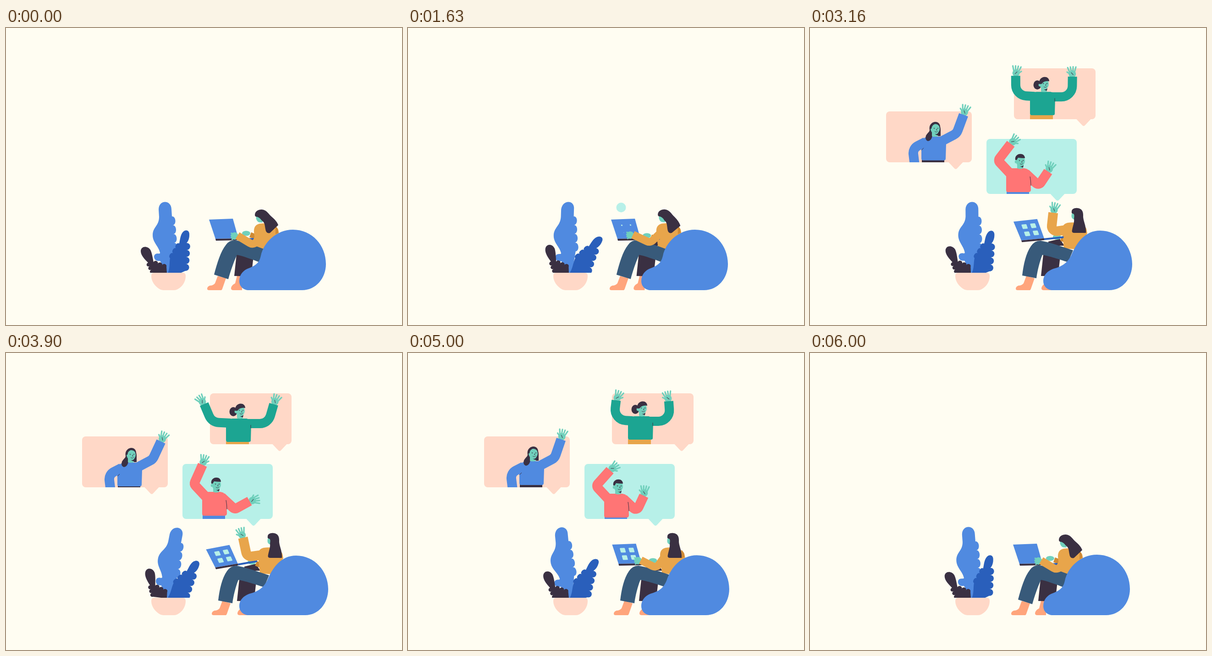
Write an HTML page with a canvas that moves like this. It is 864 px wide and 648 px high and loops after 6.03 s.

```html
<!DOCTYPE html>
<html lang="en">
<head>
<meta charset="utf-8">
<title>Video call</title>
<style>
html, body { margin: 0; width: 100%; height: 100%; overflow: hidden; background: #fffdf2; }
canvas { display: block; }
</style>
</head>
<body>
<canvas width="864" height="648"></canvas>
<script>
const g = document.querySelector('canvas').getContext('2d');
const LOOP = 6030, TAU = Math.PI * 2, DEG = Math.PI / 180;
const C = {
  paper: '#fffdf2', blue: '#508ae0', deep: '#2a5fbb', dark: '#3a3042', peach: '#ffd8c7', leg: '#ffa57c',
  gold: '#e8a54b', amber: '#cf8a34', skin: '#70d0bc', jeans: '#385a7a', mint: '#b7f0e8', coral: '#ff7575', green: '#1ca592'
};

/* ---- timing ---- */
const clamp = u => Math.max(0, Math.min(1, u));
const smooth = u => (u = clamp(u), u * u * (3 - 2 * u));
const lerp = (a, b, u) => a + (b - a) * u;
const ramp = (t, a, b) => smooth((t - a) / (b - a));
const span = (t, a, b, c, d) => ramp(t, a, b) * (1 - ramp(t, c, d));
const swing = t => Math.cos(TAU * (t - 3900) / 2200);

/* ---- drawing ---- */
function fill(d, color) {
  g.fillStyle = color;
  g.fill(new Path2D(d));
}

function line(d, color, width) {
  g.strokeStyle = color;
  g.lineWidth = width;
  g.stroke(new Path2D(d));
}

function dot(x, y, rx, ry, color) {
  g.fillStyle = color;
  g.beginPath();
  g.ellipse(x, y, rx, ry, 0, 0, TAU);
  g.fill();
}

function shifted(x, y, paint) {
  g.save();
  g.translate(x, y);
  paint();
  g.restore();
}

// Blend two paths that share one structure
function mix(a, b, u) {
  const num = /-?\d+/g, to = b.match(num);
  let i = 0;
  return a.replace(num, v => lerp(+v, +to[i++], u));
}

// Row of outward bumps along a straight edge
function scallop(x0, y0, x1, y1, n, size) {
  const dx = (x1 - x0) / n, dy = (y1 - y0) / n, k = size / Math.hypot(dx, dy);
  let d = `L${x0},${y0}`;
  for (let i = 0; i < n; i++) {
    const x = x0 + dx * i, y = y0 + dy * i, nx = dy * k, ny = -dx * k;
    const at = (px, py) => `${px.toFixed(1)},${py.toFixed(1)} `;
    d += 'C' + at(x + nx, y + ny) + at(x + dx + nx, y + dy + ny) + at(x + dx, y + dy);
  }
  return d;
}

function sleeve(sx, sy, ex, ey, cx, cy, bend, width, color) {
  g.strokeStyle = color;
  g.lineWidth = width;
  g.lineCap = 'butt';
  g.beginPath();
  g.moveTo(sx, sy);
  g.arcTo(ex, ey, cx, cy, bend);
  g.lineTo(cx, cy);
  g.stroke();
}

// Hand on a cuff; angle 0 points up
function hand(x, y, angle, open, side) {
  g.save();
  g.translate(x, y);
  g.rotate(angle);
  g.scale(side, 1);
  dot(0, -6, 8, 8, C.skin);
  g.lineCap = 'round';
  const len = 4 + 8 * open;
  for (const i of [-1.5, -0.5, 0.5, 1.5])
    line(`M${i * 3.6},-10 L${i * (3.6 + len * 0.2)},${-10 - len + Math.abs(i)}`, C.skin, 3.2);
  line(`M4,-5 L${6 + 5 * open},${-7 - 4 * open}`, C.skin, 3.2);
  if (open > 0.5) line('M-2,-4 L2,-9', C.dark, 1);
  g.restore();
}

/* ---- plant ---- */
const leaves = [
  { color: C.blue, x: 350, reach: 154, sway: 0.153, delay: 845,
    d: 'M345,535 C346,525 340,515 336,508 Q325,510 323,500 Q323,492 331,492 Q337,493 336,490 C333,476 320,468 320,452 C320,434 334,432 334,412 L333,396 C333,374 361,374 361,396'
      + scallop(362, 411, 368, 488, 4, 9) + 'L358,535Z' },
  { color: C.deep, x: 362, reach: 95, sway: 0.177, delay: 1320,
    d: 'M353,535 C358,525 356,512 358,502' + scallop(358, 502, 378, 470, 3, 6)
      + 'C380,462 380,452 386,445 C393,438 401,442 400,452 C400,460 397,466 394,469' + scallop(394, 469, 391, 530, 4, 11) + 'L380,535Z' },
  { color: C.dark, x: 345, reach: 73, sway: 0.125, delay: 1050,
    d: 'M322,535' + scallop(321, 535, 310, 512, 3, 7) + 'C303,505 294,496 294,487 C294,476 308,474 315,484 C319,492 320,502 322,511'
      + scallop(322, 511, 350, 521, 3, 6) + 'L351,535Z' }
];

// Leaves bend with height, the tip trailing the base
function plant(t) {
  const w = TAU * 2 / LOOP;
  for (const l of leaves) {
    fill(l.d.replace(/([\d.]+),([\d.]+)/g, (_, px, py) => {
      const x = px - l.x, y = py - 535, far = Math.hypot(x, y) / l.reach;
      const delay = l.delay - 180 * (1 - far);
      const a = l.sway * Math.pow(far, 0.2) * (Math.cos(w * (t - delay)) - Math.cos(w * delay));
      return [l.x + x * Math.cos(a) - y * Math.sin(a), 535 + x * Math.sin(a) + y * Math.cos(a)].join();
    }), l.color);
  }
  g.fillStyle = C.paper;
  g.fillRect(300, 534, 100, 10);
  fill('M323,534 H386 Q392,534 392,541 C392,556 382,567 372,571 Q370,572 366,572 H343 Q338,572 334,569 C325,563 317,553 317,541 Q317,534 323,534Z', C.peach);
}

/* ---- callers ---- */
const callers = [
  { fill: C.peach, start: 1765, x: 166, y: 182, w: 187, h: 111, tail: 318,
    color: C.blue, pants: C.dark, belt: [244, 287, 49], width: 21, bend: 18, hair: 'long', head: [273, 219], bob: 3,
    torso: 'M243,262 V246 Q248,236 262,236 H284 Q296,239 297,252 L296,284 Q296,288 292,288 H247 Q243,288 243,284Z',
    crease: 'M243,266 L248,261',
    arms: [{ from: [252, 248], elbow: [224, 262], len: 38, angle: 173, sway: 0, enter: 0 },
      { from: [284, 248], elbow: [320, 229], len: 43, angle: 22, sway: 3, enter: -17 }] },
  { fill: C.peach, start: 1995, x: 445, y: 88, w: 178, h: 111, tail: 597,
    color: C.green, pants: C.gold, belt: [480, 188, 50], width: 20, bend: 24, hair: 'bun', head: [511, 121], bob: 5,
    torso: 'M480,150 Q482,138 495,138 H525 Q535,140 535,150 L534,186 Q534,189 530,189 H484 Q480,189 480,185Z',
    crease: 'M534,152 V159',
    arms: [{ from: [490, 148], elbow: [449, 146], len: 43, angle: -8, sway: -15, enter: 22 },
      { from: [525, 149], elbow: [572, 149], len: 44, angle: 6, sway: 10, enter: 0 }] },
  { fill: C.mint, start: 1630, x: 385, y: 242, w: 197, h: 120, tail: 540,
    color: C.coral, pants: C.blue, belt: [429, 358, 49], width: 21, bend: 7, hair: 'short', head: [459, 291], bob: -4,
    torso: 'M428,322 Q432,307 442,307 H468 Q480,309 481,320 L482,355 Q481,359 477,359 H432 Q428,359 428,355Z',
    crease: 'M480,325 Q482,335 482,345',
    arms: [{ from: [440, 322], elbow: [410, 290], len: 46, angle: 33, sway: -9, enter: -58 },
      { from: [470, 318], elbow: [499, 345], len: 37, angle: 43, sway: 18, enter: 14 }] }
];

const caps = {
  long: 'M-11,0 C-13,-19 12,-20 11,-3 Q6,-11 -1,-10 Q-7,-8 -8,0Z',
  bun: 'M-11,0 C-13,-19 11,-20 11,-6 Q0,-8 -6,0Z',
  short: 'M-11,-2 C-14,-18 10,-20 10,-6 Q2,-6 -5,-7 L-8,-2Z'
};

// A dot pops out of the laptop, flies up and unfolds, first in width, then in height
function frame(c, t) {
  const dotSize = 21, pop = ramp(t, c.start - 110, c.start), u = clamp((t - c.start) / 700);
  const wide = smooth(u * 2.3), tall = smooth(u * 1.15);
  const w = lerp(dotSize * pop, c.w, wide), h = lerp(dotSize * pop, c.h, tall) + 6 * Math.sin(Math.PI * u);
  const cx = lerp(465, c.x + c.w / 2, wide);
  const cy = lerp(412 - 20 * pop, c.y + c.h / 2, 1 - (1 - u) ** 3);
  return { x: cx - w / 2, y: cy - h / 2, w, h, bottom: cy + h / 2, tail: 15 * smooth((u - 0.43) * 3) };
}

function bubble(c, t) {
  const { x, y, w, h, bottom, tail } = frame(c, t), m = c.tail;
  if (w <= 0) return;
  const r = Math.min(w / 2, h / 2, 8 + Math.max(0, 150 - w) / 6);
  g.fillStyle = c.fill;
  g.beginPath();
  g.roundRect(x, y, w, h, r);
  g.fill();
  if (tail > 0)
    fill(`M${m - 16},${bottom - 0.5} L${m - 3},${bottom + tail * 0.88} Q${m},${bottom + tail * 1.1} ${m + 3},${bottom + tail * 0.88} L${m + 16},${bottom - 0.5}Z`, c.fill);
}

function head(hair) {
  if (hair === 'long')
    fill('M-12,3 C-16,-18 12,-20 12,2 L12,16 L-6,16 Q-9,27 -16,27 Q-23,24 -20,15 C-14,6 -13,8 -12,3Z', C.dark);
  if (hair === 'bun') dot(-15, 2, 8.5, 10, C.dark);
  fill('M-7,4 H6 V16 Q0,19 -7,16Z', C.skin);
  fill('M-1,11 Q4,13 7,9 L6,14 Q3,15 -1,11Z', C.dark);
  dot(0, 0, 10, 11.5, C.skin);
  if (hair !== 'long') dot(-9.5, 2, 2.8, 3.2, C.skin);
  fill(caps[hair], C.dark);
  dot(-2, -1, 1, 1.1, C.dark);
  dot(6, -1, 1, 1.1, C.dark);
  line('M3,0 L4,3 H2 M-1,6 Q3,9 6,5', C.dark, 0.9);
}

function caller(c, t) {
  const since = t - c.start;
  if (since < 160) return;
  const beat = swing(t), enter = 1 - ramp(t, 2300, 2800);
  const rise = 150 * (1 - ramp(since, 160, 710)) - 14 * ramp(t, 5350, 5850);
  g.save();
  g.beginPath();
  g.rect(0, 0, 864, frame(c, t).bottom);
  g.clip();
  g.translate(0, rise + c.bob * (1 + beat) / 2);
  c.arms.forEach((arm, i) => {
    const sway = arm.sway * beat, angle = (arm.angle + sway + arm.enter * enter) * DEG;
    const x = arm.elbow[0] + arm.len * Math.sin(angle), y = arm.elbow[1] - arm.len * Math.cos(angle);
    hand(x, y, angle + sway * DEG, 1, i ? -1 : 1);
    sleeve(...arm.from, ...arm.elbow, x, y, c.bend, c.width, c.color);
  });
  g.fillStyle = c.pants;
  g.fillRect(...c.belt, 40);
  fill(c.torso, c.color);
  line(c.crease, C.dark, 1);
  shifted(...c.head, () => head(c.hair));
  g.restore();
}

// Fade out whatever is drawn so far
function veil(amount) {
  g.globalAlpha = amount;
  g.fillStyle = C.paper;
  g.fillRect(0, 0, 864, 648);
  g.globalAlpha = 1;
}

/* ---- woman ---- */
const foot = 'M462,541 L456,557 Q452,562 445,562 Q439,564 439,569 Q439,572 443,572 H470 Q472,570 473,566 L480,546Z';
const torso = 'M541,445 Q540,430 553,427 C570,424 590,430 594,440 L596,450 L575,485 L545,483Z';

// Parts that change shape: [upright, leaning back]
const parts = {
  jeans: ['M454,538 C461,512 468,488 480,473 Q487,463 499,463 C520,466 540,474 562,482 L553,511 C535,504 515,497 504,495 C497,510 490,530 485,548Z',
    'M463,540 C466,515 471,492 482,476 Q490,464 503,464 C525,468 550,477 574,485 L563,511 C545,505 520,497 507,495 C501,510 496,530 494,546Z'],
  face: ['M546,410 Q544,418 550,423 Q554,425 560,424 L558,408Z', 'M567,403 Q564,411 567,415 Q569,418 574,418 L576,402Z'],
  hair: ['M543,408 C543,400 550,396 558,396 C570,397 573,407 581,413 C587,418 592,424 594,430 L576,447 Q570,449 567,443 C564,432 566,425 558,420 Q554,414 548,412 Q543,412 543,408Z',
    'M566,400 C566,395 572,392 579,393 C588,394 591,400 591,408 C590,420 598,430 597,447 L571,447 Q565,447 567,440 C569,430 572,424 571,416 Q573,404 568,405 Q565,404 566,400Z'],
  bag: ['M530,572 C518,572 509,564 509,552 C509,538 518,528 530,524 C548,517 553,510 556,497 C562,468 590,440 626,440 C668,440 698,474 698,515 C698,546 676,572 646,572Z',
    'M530,572 C518,572 509,564 509,552 C509,538 520,529 532,525 C552,520 562,511 570,496 C582,468 600,442 633,442 C673,442 703,476 703,515 C703,546 682,572 653,572Z']
};

function laptop(x, y, turn, t) {
  g.save();
  g.translate(x, y);
  g.rotate(turn);
  fill('M50,-1 L93,-2 L92,2 L50,3Z', C.deep);
  fill('M0,0 L-14,-42 L38,-44 L50,-1Z', C.blue);
  fill('M0,0 L50,-1 V3 L1,4Z', C.dark);
  g.transform(1, -0.03, 0.28, 1, 0, 0);
  g.fillStyle = C.mint;
  for (let i = 0; i < 4; i++) {
    const top = i < 2, s = span(t, top ? 1530 : 1580, top ? 1830 : 1880, 5350, 5650);
    g.beginPath();
    g.roundRect(17.5 + 19 * (i % 2) - 5.5 * s, (top ? -29 : -13) - 5 * s, 11 * s, 10 * s, 1.5 * s);
    g.fill();
  }
  g.restore();
}

function woman(t) {
  const lean = span(t, 1500, 2200, 5100, 5720), bag = span(t, 1600, 2300, 4400, 5750);
  const wave = span(t, 2700, 3120, 4400, 4900), beat = swing(t);
  const reach = (1 - Math.cos(TAU * 13 * t / LOOP)) / 2;
  const part = (name, color, u = lean) => fill(mix(...parts[name], u), color);

  shifted(14 * lean, 0, () => fill('M504,541 L500,557 Q491,562 491,568 Q491,572 496,572 H515 V541Z', C.leg));
  shifted(6 * lean, 0, () => fill('M503,494 L540,498 L535,542 L498,541Z', C.dark));
  fill('M520,466 L545,460 L555,475 L520,475Z', C.dark);

  const fx = 524 + 12 * lean - 4 * reach + 4 * wave, fy = 448 + 5 * lean + 5 * reach * (1 - lean) + 3 * wave;
  sleeve(fx + 40, fy - 2, fx + 22, fy + 8, fx + 9, fy + 3, 4, 11, C.amber);
  dot(fx, fy, 9, 5.5, C.skin);
  shifted(9 * lean, -2 * lean, () => {
    fill(torso, C.gold);
    fill('M588,432 Q594,436 594,447 L588,450Z', C.amber);
  });
  laptop(457 + 4 * bag - wave * (1.5 + 3 * beat), 460 + wave * (5 + 3 * beat), -wave * (0.1 + 0.05 * beat), t);
  shifted(10 * lean, 0, () => fill(foot, C.leg));
  part('jeans', C.jeans);

  const ex = lerp(543 + 5 * lean - 15 * reach, 526, wave), ey = lerp(476 - 4 * lean - 7 * reach, 445, wave);
  const cx = lerp(505 + 9 * lean - 15 * reach, 526 - 9 * beat, wave), cy = lerp(453 - 2 * reach, 403, wave);
  hand(cx, cy, lerp(-97, 6 - 24 * beat, wave) * DEG, wave, -1);
  sleeve(557 + 6 * lean, 441 - lean, ex, ey, cx, cy, 11, 17 + 4 * wave, C.gold);
  shifted(5 * wave, 0, () => {
    part('face', C.skin);
    part('hair', C.dark);
  });
  part('bag', C.blue, bag);
}

function draw(t) {
  g.fillStyle = C.paper;
  g.fillRect(0, 0, 864, 648);
  callers.forEach(c => bubble(c, t));
  veil(ramp(t, 5350, 5690));
  callers.forEach(c => caller(c, t));
  veil(ramp(t, 5450, 5880));
  plant(t);
  woman(t);
}

const begin = performance.now();
function tick() {
  draw((performance.now() - begin) % LOOP);
  requestAnimationFrame(tick);
}
tick();
</script>
</body>
</html>
```
